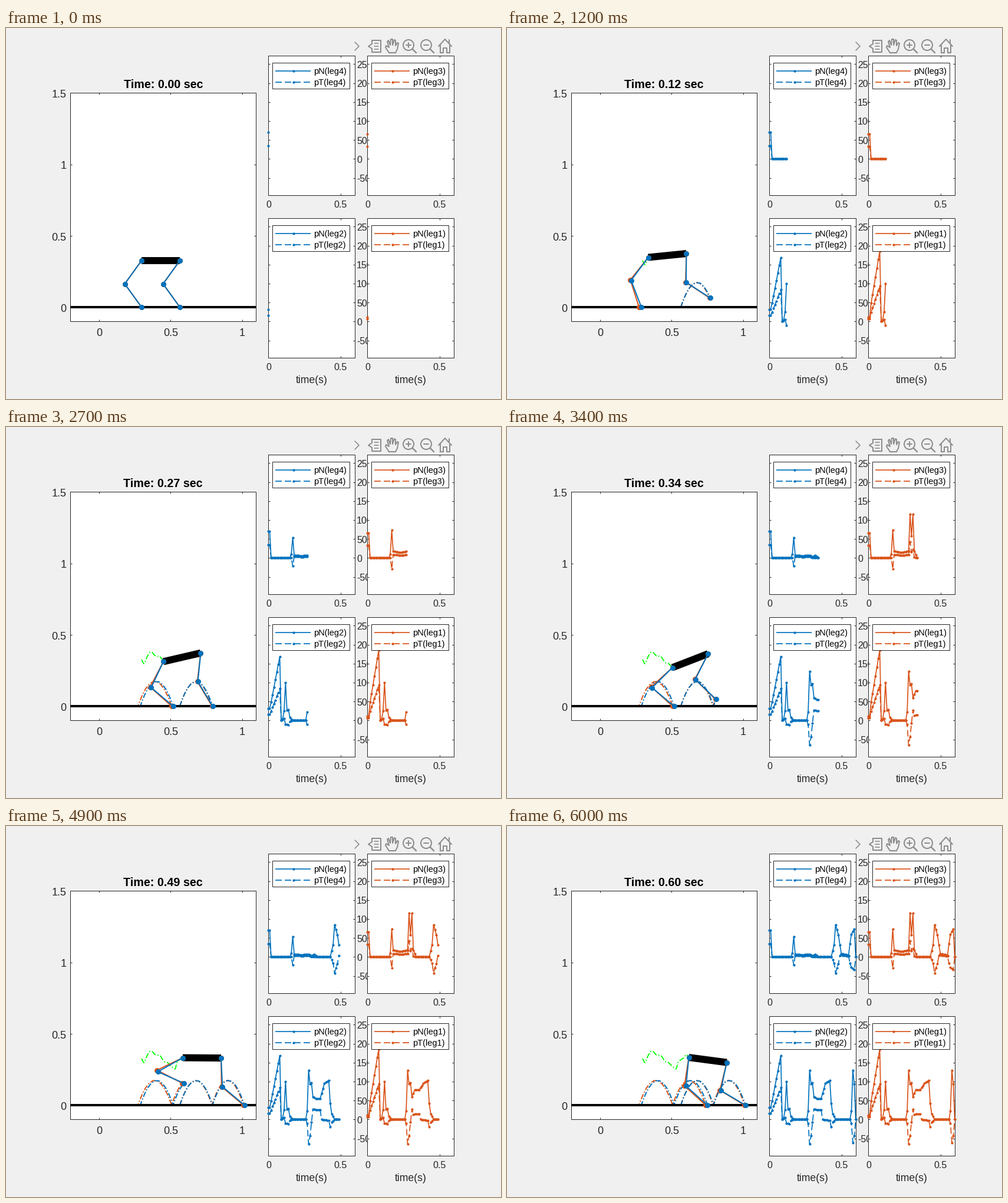
A matplotlib script that plays this animation: 840x630 px, repeating every 6.1 s.

```python
import numpy as np
import matplotlib.pyplot as plt
from matplotlib.animation import FuncAnimation
from matplotlib.patches import Rectangle, Circle

W, H, DPI = 840, 630, 100
STEPS = 61
T = np.arange(STEPS)
BLUE, ORANGE, GREEN = "#0072BD", "#D95319", "#00FF00"
INK, ICON = "#262626", "#8c8c8c"

plt.rcParams["font.family"] = "Liberation Sans"
fig = plt.figure(figsize=(W / DPI, H / DPI), dpi=DPI, facecolor="#f0f0f0")
ax = fig.add_axes([0, 0, 1, 1])
ax.set_xlim(0, W)
ax.set_ylim(H, 0)
ax.axis("off")


# ---------- drawing helpers, all in pixels ----------
def pt(px):
    return px * 72 / DPI


def line(xs, ys, color=INK, width=1.0, z=1.0, dashes=None, dot=0, **kw):
    style = "-" if dashes is None else (0, [d / width for d in dashes])
    marker = dict(marker="o", ms=pt(dot), mew=0) if dot else {}
    kw.setdefault("solid_capstyle", "butt")
    return ax.plot(xs, ys, color=color, lw=pt(width), ls=style, zorder=z,
                   dash_capstyle="butt", **marker, **kw)[0]


def label(x, y, s, size, z=1.0, color=INK, ha="center", **kw):
    return ax.text(x, y, s, fontsize=pt(size), color=color, ha=ha,
                   va="baseline", zorder=z, **kw)


def box(x0, y0, x1, y1, z):
    ax.add_patch(Rectangle((x0, y0), x1 - x0, y1 - y0, fc="white",
                           ec=INK, lw=pt(1), zorder=z))


def ticks(x0, y0, x1, y1, xs, ys, z):
    for x in xs:
        line([x, x], [y0, y0 + 3], z=z)
        line([x, x], [y1, y1 - 3], z=z)
    for y in ys:
        line([x0, x0 + 3], [y, y], z=z)
        line([x1, x1 - 3], [y, y], z=z)


# ---------- walking model ----------
GROUND, LINK, BODY = 474, 48.7, 65
SWING, LIFT = 12.5, 42


def spline(frames, values):
    """Smooth curve through a few key points, sampled at every step."""
    k, v = np.array(frames, float), np.array(values, float)
    m = np.gradient(v, k)
    j = np.clip(np.searchsorted(k, T, side="right") - 1, 0, len(k) - 2)
    h = k[j + 1] - k[j]
    u = (T - k[j]) / h
    return ((1 + 2 * u) * (1 - u) ** 2 * v[j] + u * (1 - u) ** 2 * h * m[j]
            + u * u * (3 - 2 * u) * v[j + 1] - u * u * (1 - u) * h * m[j + 1])


def foot(home, stops, lifts):
    """Slip from home to the first stop, then swing in eased parabolas."""
    x = np.interp(T, [8, 12], [home, stops[0]])
    y = np.full(STEPS, float(GROUND))
    for start, a, b in zip(lifts, stops, stops[1:]):
        u = np.clip((T - start) / SWING, 0, 1)
        e = u * u * (3 - 2 * u)
        x += (b - a) * e
        y -= LIFT * 4 * e * (1 - e)
    return np.array([x, y])


def leg(hip, toe):
    """Hip, knee and toe per step; the knee bends backwards."""
    d = toe - hip
    d = d * np.minimum(1, 1.995 * LINK / np.hypot(*d))
    reach = np.hypot(*d)
    bend = np.sqrt(LINK ** 2 - reach ** 2 / 4)
    knee = hip + d / 2 + np.array([-d[1], d[0]]) / reach * bend
    return np.array([hip, knee, hip + d])


rear = np.array([
    spline([0, 12, 21, 30, 38, 42, 49, 60],
           [230, 239.7, 255, 273, 287, 290, 300, 308.5]),
    spline([0, 7, 12, 15.5, 21, 24, 28, 30, 34, 38, 42, 49, 53, 60],
           [395, 401.5, 389.5, 382, 389.5, 389.5, 400.5, 401, 408.5, 412.5,
            402, 393.5, 388.5, 393])])
nose = spline([0, 12, 21, 34, 42, 60], [395, 383, 383.5, 385, 389.5, 401.5])
front = np.array([rear[0] + np.sqrt(BODY ** 2 - (nose - rear[1]) ** 2), nose])

REAR_LIFTS, FRONT_LIFTS = (14.2, 44.2), (2, 31.9)
legs = [
    (ORANGE, leg(rear, foot(230, (224, 281, 337), REAR_LIFTS))),
    (ORANGE, leg(front, foot(295, (295, 349.5, 403), FRONT_LIFTS))),
    (BLUE, leg(rear, foot(230, (228, 283.5, 340), REAR_LIFTS))),
    (BLUE, leg(front, foot(295, (295, 350.5, 404.5), FRONT_LIFTS))),
]

# ---------- walking view ----------
box(109, 110, 424, 498, 0.5)
ticks(109, 110, 424, 498, [158, 279, 401], [110, 232, 353, 474], 0.8)
for n, s in enumerate(["0", "0.5", "1"]):
    label(158 + 121.3 * n, 523, s, 18)
for n, s in enumerate(["0", "0.5", "1", "1.5"]):
    label(102.5, 482 - 121.3 * n, s, 18, ha="right")
title = label(266.8, 102.4, "", 19.8, color="black", weight="bold")

DASHDOT = [9, 3, 2, 3]
traces = [(line([], [], c, 2, 2 + 0.1 * n, DASHDOT), p[2])
          for n, (c, p) in enumerate(legs)]
traces.append((line([], [], GREEN, 1.8, 2.6, DASHDOT), rear))
line([109, 424], [GROUND, GROUND], "black", 4, 3)
body = line([], [], "black", 12, 3.2)
limbs = [(line([], [], c, 2, 4 + 0.1 * n, dot=9), p) for n, (c, p) in enumerate(legs)]

# ---------- contact forces ----------
def burst(*points, at=0):
    """Straight segments through (step, newton) points, zero outside."""
    k, v = zip(*points)
    return np.interp(T - at, k, v, left=0, right=0)


def rear_force(start, push, sag, drive):
    """Push-off, a light touch, a full stance and the next landing."""
    landing = (-2, 0), (-1, 22), (0, 130), (1, 93)
    normal = (burst((0, start), (1, start), (2, 48), (8, push))
              + burst((10, 4), (11, 25), (12, 100), (13, 27), (14, 29), (15, 8), (17, 0))
              + burst(*landing, at=28) + burst(*landing, at=58)
              + burst((30, 96), (31, 60), (33, sag), (36, sag), (39, 95),
                      (42, 103), (43, 43), (44, 15), (46, 0)))
    grip = np.interp(T, [10, 13, 28, 29, 30, 31, 32, 36, 37, 42, 43],
                     [.5, -.4, -.5, -.47, -.08, .45, drive, drive, 0, -.03, -.47])
    return normal, normal * grip


def front_force(start, kick, load, spike):
    """Standing load, first touch, stance, second landing and push."""
    normal = (burst((0, start), (1, start))
              + burst((15, 0), (16, 10), (17, kick))
              + burst((18, load), (23, load * .8), (28, load), (29, spike),
                      (30, spike / 2), (31, spike), (32, load), (34, 0))
              + burst((43, 0), (45, 32), (46, 85), (48, 58), (49, 32), (50, 9),
                      (55, 4), (56, 35), (57, 60), (59, 73)))
    grip = np.interp(T, [15, 17, 18, 28, 32, 44, 46, 48, 50, 55, 56],
                     [.5, -.4, .5, .45, .1, -.5, -.5, -.3, .5, .5, -.47])
    return normal, normal * grip


FORCES = {
    "leg4": front_force(70, 54, 7, 5),
    "leg3": front_force(66, 73, 18, 115),
    "leg2": rear_force(32, 168, 55, .46),
    "leg1": rear_force(12, 186, 78, .18),
}

# ---------- force plots ----------
DX, SCALE = 146.8 / 60, 32.2 / 50
DASH = [11, 5]
curves = []


def panel(name, x0, y0, color, z, bottom=False):
    x1, y1, zero = x0 + 146.5, y0 + 237, y0 + 175.3
    levels = range(-50, 300, 50)
    box(x0, y0, x1, y1, z)
    ticks(x0, y0, x1, y1, [x0 + 122.5], [zero - v * SCALE for v in levels], z + 0.1)
    label(x0 + 0.5, y1 + 21, "0", 16, z)
    label(x0 + 122.8, y1 + 21, "0.5", 16, z)
    if bottom:
        label(x0 + 74, y1 + 43, "time(s)", 17.6, z)
    if color == BLUE:
        for v in levels:
            label(595, zero - v * SCALE + 6.5, str(v), 16, z, ha="left")

    left = x0 + 7
    box(left, y0 + 12, left + 131, y0 + 56, z + 2)
    for n, (kind, dashes) in enumerate([("pN", None), ("pT", DASH)]):
        y = y0 + 25.5 + 19 * n
        line([left + 5, left + 65], [y, y], color, 1.7, z + 2.1, dashes)
        line([left + 35.5], [y], color, 1, z + 2.2, dot=4.2)
        label(left + 70, y + 5.5, f"{kind}({name})", 14.5, z + 2.1, "black", "left")
        ys = zero - FORCES[name][n] * SCALE
        curves.append((line([], [], color, 1.7, z + 1, dashes, dot=4.2), x0 + T * DX, ys))


panel("leg4", 445, 47, BLUE, 5)
panel("leg2", 445, 323, BLUE, 5, True)
panel("leg3", 613, 47, ORANGE, 9)
panel("leg1", 613, 323, ORANGE, 9, True)


# ---------- toolbar ----------
def stroke(points, width=2):
    xs, ys = zip(*points)
    line(xs, ys, ICON, width, 1, solid_joinstyle="round", solid_capstyle="round")


stroke([(592, 24), (599, 31), (592, 38)], 1.6)
stroke([(621, 21), (636, 21), (636, 41), (621, 41), (621, 35), (615, 31),
        (621, 27), (621, 21)])
for y in (26, 31, 36):
    stroke([(625, y), (632, y)], 1.6)
stroke([(650, 42), (644, 33), (645, 30), (650, 33), (647, 23), (649, 21), (652, 29),
        (653, 19), (656, 19), (656, 29), (659, 20), (661, 21), (661, 30), (664, 25),
        (666, 26), (664, 36), (661, 42), (650, 42)])
for x in (683, 713):
    ax.add_patch(Circle((x, 29), 9, fc="none", ec=ICON, lw=pt(2), zorder=1))
    stroke([(x + 7, 36), (x + 13, 42)], 2.4)
    stroke([(x - 4, 29), (x + 4, 29)])
stroke([(683, 25), (683, 33)])
stroke([(734, 31), (745, 19), (756, 31)])
stroke([(737, 29), (737, 42), (742, 42), (742, 34), (748, 34), (748, 42),
        (753, 42), (753, 29)])
stroke([(752, 20), (752, 25)])


def update(i):
    title.set_text(f"Time: {i / 100:.2f} sec")
    body.set_data([rear[0, i], front[0, i]], [rear[1, i], front[1, i]])
    for art, path in traces:
        art.set_data(path[0, :i + 1], path[1, :i + 1])
    for art, joints in limbs:
        art.set_data(joints[:, 0, i], joints[:, 1, i])
    for art, xs, ys in curves:
        art.set_data(xs[:i + 1], ys[:i + 1])
    return []


anim = FuncAnimation(fig, update, frames=STEPS, interval=100, repeat=True,
                     repeat_delay=0, blit=False)
plt.show()
```
